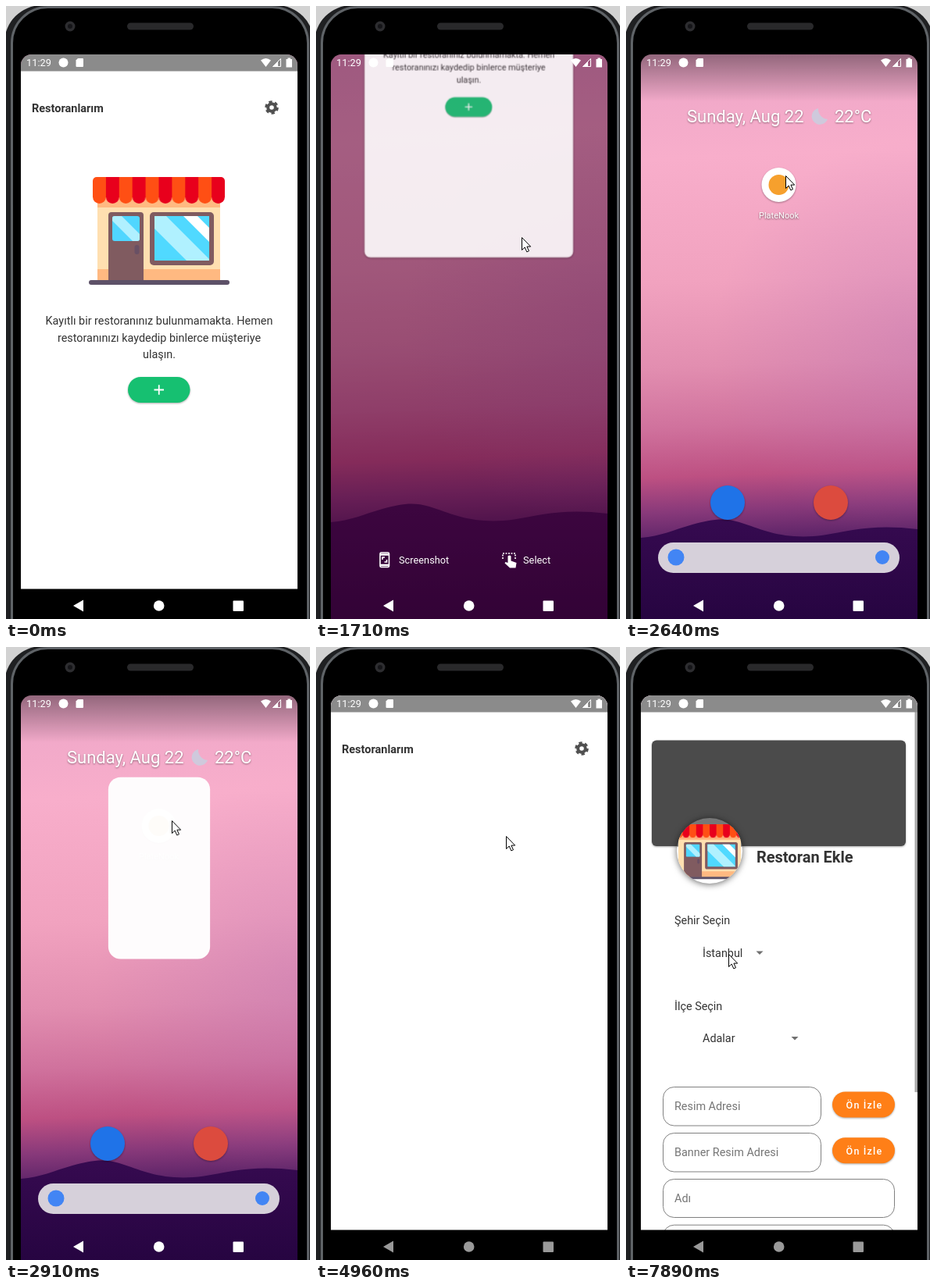
Recreate the animation shown at these times as an HTML page. Size 389 by 785 pixels, loop 8000 ms.

```html
<!DOCTYPE html>
<html lang="tr">
<head>
<meta charset="utf-8">
<title>Restoranlarım</title>
<style>
  html, body { margin: 0; width: 100%; height: 100%; overflow: hidden; background: #d2d2d2; }
  svg { display: block; width: 389px; height: 785px; font: 14.4px Roboto, sans-serif; }
  text { fill: #333; }
  .bold { font-weight: 700; }
  .mid { text-anchor: middle; }
  .light, .light text { fill: #fff; }
  .hint { fill: #757575; }
  .field { fill: #fff; stroke: #808080; }
  .pill { filter: drop-shadow(0 1px 1px #0005); }

  .anim { animation: 8s linear infinite; }
  .swap { animation: 8s step-end infinite; }
  #window { animation-name: window; }
  #sheet { animation-name: sheet; }
  #wall { animation-name: wall; }
  #scrim { animation-name: scrim; }
  #actions { animation-name: actions; }
  #home { animation-name: home; }
  #launch { animation-name: launch; }
  #splash { animation-name: splash; }
  #bars { animation-name: bars; }
  #status { animation-name: status; }
  #nav { animation-name: nav; }
  #content { animation-name: content; }
  #press { animation-name: press; }
  #form { animation-name: form; }
  #selects { animation-name: selects; }
  #fields { animation-name: fields; }
  #thumb { animation-name: thumb; }
  #cursor { animation-name: cursor; }

  @keyframes window {
    0%, 11% { transform: none; opacity: 1; }
    14% { transform: translate(47.7px, 68.4px) scale(.754); opacity: .85; }
    15.6%, 17.5% { transform: translate(47.7px, 68.4px) scale(.754); opacity: .78; }
    21.3%, 21.5% { transform: translate(47.7px, -241.4px) scale(.754); opacity: .89; }
    23.5% { transform: translate(47.7px, -560px) scale(.754); opacity: .89; }
    23.6% { transform: translate(47.7px, -560px) scale(.754); opacity: 0; }
    23.7%, 57.45% { transform: none; opacity: 0; }
    57.5%, 100% { transform: none; opacity: 1; }
  }
  @keyframes sheet {
    0%, 11% { rx: 0; }
    14%, 24% { rx: 10px; }
    25%, 100% { rx: 0; }
  }
  @keyframes wall {
    0%, 23.5% { transform: translateY(-20px); }
    29%, 100% { transform: none; }
  }
  @keyframes scrim {
    0%, 15.6% { opacity: .36; }
    21.4%, 23.5% { opacity: .47; }
    29%, 100% { opacity: 0; }
  }
  @keyframes actions {
    0%, 13% { opacity: 0; }
    15.6% { opacity: .85; }
    20%, 22.5% { opacity: 1; }
    25%, 100% { opacity: 0; }
  }
  @keyframes home {
    0%, 25% { opacity: 0; }
    30%, 40% { opacity: 1; }
    41%, 100% { opacity: 0; }
  }
  @keyframes launch {
    0%, 35.6% { x: 174px; y: 207px; width: 44px; height: 44px; rx: 22px; opacity: 0; animation-timing-function: ease-out; }
    36.5% { opacity: 1; }
    40%, 100% { x: 19px; y: 62px; width: 354px; height: 723px; rx: 0; opacity: 1; }
  }
  @keyframes splash {
    0%, 37% { opacity: 0; }
    40%, 100% { opacity: 1; }
  }
  @keyframes bars {
    0%, 11% { opacity: 1; }
    13%, 37.5% { opacity: 0; }
    40%, 100% { opacity: 1; }
  }
  @keyframes status {
    0%, 11% { opacity: 1; }
    13%, 17.5% { opacity: 0; }
    20%, 100% { opacity: 1; }
  }
  @keyframes nav {
    0%, 11% { opacity: 1; }
    13%, 17.5% { opacity: 0; }
    20%, 43.9% { opacity: 1; }
    57.5%, 100% { opacity: .6; }
  }
  @keyframes content {
    0% { opacity: 1; }
    40% { opacity: 0; }
    65.6%, 100% { opacity: 1; }
  }
  @keyframes press {
    0%, 82% { opacity: 0; }
    84% { opacity: .25; }
    86.5%, 100% { opacity: 0; }
  }
  @keyframes form {
    0% { opacity: 0; }
    86.875%, 100% { opacity: 1; }
  }
  @keyframes selects {
    0% { opacity: 0; }
    93.5%, 100% { opacity: 1; }
  }
  @keyframes fields {
    0% { transform: translateY(-253px); }
    93.5%, 100% { transform: none; }
  }
  @keyframes thumb {
    0% { height: 617px; }
    93.5%, 100% { height: 487px; }
  }
  @keyframes cursor {
    0%, 1.6% { transform: translate(335px, 692px); opacity: 0; }
    1.65% { transform: translate(335px, 692px); opacity: 1; animation-timing-function: ease-in-out; }
    8.25%, 10.9% { transform: translate(292px, 764px); opacity: 1; }
    15.625% { transform: translate(236px, 502px); }
    17.2% { transform: translate(238px, 482px); }
    21.3%, 21.5% { transform: translate(263px, 296px); animation-timing-function: ease-out; }
    31.375%, 34.5% { transform: translate(204px, 217px); }
    43.8%, 64.5% { transform: translate(243px, 242px); }
    66.9% { transform: translate(265px, 203px); }
    69.5%, 71.25% { transform: translate(280px, 235px); animation-timing-function: ease-in-out; }
    77.8%, 83.75% { transform: translate(193.5px, 496px); animation-timing-function: ease-in-out; }
    98.6%, 100% { transform: translate(131px, 393px); opacity: 1; }
  }
</style>
</head>
<body>
<svg viewBox="0 0 389 785">
  <defs>
    <clipPath id="screen"><rect x="19" y="62" width="354" height="740" rx="14"/></clipPath>
    <clipPath id="avatar"><circle cx="107" cy="261" r="42"/></clipPath>
    <clipPath id="pane"><path d="M190 269h70v57h-70z"/></clipPath>
    <clipPath id="doorPane"><rect x="136" y="269" width="35" height="32" rx="3"/></clipPath>
    <linearGradient id="sky" gradientUnits="userSpaceOnUse" x1="180" y1="62" x2="205" y2="700">
      <stop offset="0" stop-color="#eda6c8"/>
      <stop offset=".2" stop-color="#f8aecb"/>
      <stop offset=".45" stop-color="#f1a2bf"/>
      <stop offset=".62" stop-color="#e28eb0"/>
      <stop offset=".74" stop-color="#d0729d"/>
      <stop offset=".84" stop-color="#bd5082"/>
      <stop offset=".91" stop-color="#88397a"/>
      <stop offset="1" stop-color="#46195f"/>
    </linearGradient>
    <radialGradient id="haze" gradientUnits="userSpaceOnUse" cx="373" cy="430" r="260">
      <stop offset="0" stop-color="#b873b4" stop-opacity=".35"/>
      <stop offset="1" stop-color="#b873b4" stop-opacity="0"/>
    </radialGradient>
    <linearGradient id="hill" x2="0" y2="1">
      <stop offset="0" stop-color="#360a50"/>
      <stop offset="1" stop-color="#22033d"/>
    </linearGradient>
    <linearGradient id="shade" x2="0" y2="1">
      <stop offset="0" stop-opacity=".38"/>
      <stop offset="1" stop-opacity="0"/>
    </linearGradient>
    <linearGradient id="disc" x2="0" y2="1">
      <stop offset="0" stop-color="#777"/>
      <stop offset=".43" stop-color="#777"/>
      <stop offset=".44" stop-color="#fff"/>
    </linearGradient>
    <pattern id="awning" patternUnits="userSpaceOnUse" x="111" y="219" width="33.8" height="34">
      <path d="M0 0h16.9v25.5a8.45 8.45 0 0 1-16.9 0z" fill="#ff4f14"/>
      <path d="M16.9 0h16.9v25.5a8.45 8.45 0 0 1-16.9 0z" fill="#e8001c"/>
    </pattern>
    <g id="shop">
      <path d="M117 240h157v112H117z" fill="#ffdfb0"/>
      <path d="M117 240h157v18H117zM117 337h157v15H117z" fill="#ffb981"/>
      <rect x="111" y="219" width="169" height="34" rx="5" fill="url(#awning)"/>
      <path d="M131 352v-84q0-4 4-4h37q4 0 4 4v84z" fill="#805b60"/>
      <g clip-path="url(#doorPane)">
        <path d="M136 269h35v32h-35z" fill="#50d6ff"/>
        <path d="M136 269h12l32 32h-18l-26-26z" fill="#b0f0ff"/>
      </g>
      <rect x="164.500" y="306" width="6" height="12" rx="3" fill="#695064"/>
      <rect x="184" y="264" width="82" height="68" rx="5" fill="#805b60"/>
      <g clip-path="url(#pane)">
        <path d="M190 269h70v57h-70z" fill="#50d9ff"/>
        <path d="M190 269h15l57 57h-31l-41-41z" fill="#b0f1ff"/>
        <path d="M227 269h18l20 20v18z" fill="#fff"/>
      </g>
      <rect x="106" y="351" width="180" height="6" rx="3" fill="#5d5168"/>
    </g>
    <rect id="wide" class="field" x="47.500" y="681.500" width="296" height="49" rx="14"/>
    <g id="preview">
      <rect class="pill" x="264" y="569.500" width="80" height="33" rx="16.500" fill="#ff7f17"/>
      <text class="light mid" x="305" y="591" font-size="12.500" font-weight="500" letter-spacing="1.200">Ön İzle</text>
    </g>
    <path id="drop" d="M-4.500-2h9L0 2.500z" fill="#707070"/>
  </defs>

  <!-- phone body -->
  <rect x="-2" y="-1" width="396" height="900" rx="48" fill="#1f2022"/>
  <rect x="7.500" y="1.500" width="379" height="900" rx="46" stroke="#5f6367" stroke-width="3"/>
  <circle cx="82" cy="26" r="6.500" fill="#2d2d30"/>
  <circle cx="82" cy="26" r="3" fill="#151518"/>
  <rect x="155" y="21.500" width="85" height="9" rx="4.500" fill="#29292b"/>

  <g clip-path="url(#screen)">
    <g id="wall" class="anim">
      <path d="M19 30h354v780H19z" fill="url(#sky)"/>
      <path d="M19 30h354v780H19z" fill="url(#haze)"/>
      <path d="M19 681C45 679 60 671 85 664S125 655 145 661S185 677 215 679S265 675 290 671S340 666 373 670V820H19z" fill="url(#hill)"/>
    </g>
    <path id="scrim" class="anim" d="M19 62h354v723H19z" fill="#45042d"/>

    <g id="home" class="anim">
      <path d="M19 62h354v60H19z" fill="url(#shade)"/>
      <g class="light" font-size="22" style="filter:drop-shadow(0 1px 1px #0006)">
        <text x="78" y="149">Sunday, Aug 22</text>
        <text x="267" y="149">22°C</text>
      </g>
      <path d="M246 131a10.500 10.500 0 1 0 12 14a13 13 0 0 1-12-14z" fill="#cfc9dc"/>
      <circle class="pill" cx="195.500" cy="229" r="22" fill="#fff"/>
      <circle cx="195.500" cy="229" r="13" fill="#f6a02d"/>
      <text class="light mid" x="195.500" y="272" font-size="11" style="filter:drop-shadow(0 1px 1px #0008)">PlateNook</text>
      <circle class="pill" cx="130" cy="636" r="22" fill="#1f73e8"/>
      <circle class="pill" cx="262" cy="636" r="22" fill="#dc4b3e"/>
      <rect x="41" y="687" width="309" height="39" rx="19.500" fill="#d6d0da"/>
      <circle cx="64" cy="706" r="10.500" fill="#4285f4"/>
      <circle cx="328" cy="706" r="9" fill="#4285f4"/>
    </g>

    <g id="actions" class="anim light" font-size="12.800">
      <text x="106" y="714">Screenshot</text>
      <text x="265" y="714">Select</text>
      <g fill="none" stroke="#fff" stroke-width="1.600">
        <rect x="82" y="700" width="11.500" height="18.500" rx="1.500"/>
        <path d="M82 702.500h11M82 716h11" stroke-width="2.500"/>
        <path d="M85 709v-3h3M90.500 709v3h-3"/>
        <path d="M239 708v-7h16v7" stroke-dasharray="2 1.500"/>
      </g>
      <path d="M245.500 704.500q2-2 4 0v6l7 2.500-1 6.500h-7.500l-6.500-6 1-1.500 3 1z"/>
    </g>

    <rect id="launch" class="anim" fill="#fff"/>
    <g id="splash" class="anim">
      <circle cx="195.500" cy="371" r="43" fill="#f78c1e"/>
      <text class="bold mid" x="195.500" y="477" font-size="22">PlateNook</text>
    </g>

    <g id="window" class="anim">
      <rect id="sheet" class="anim" x="19" y="83" width="354" height="664" fill="#fff" style="filter:drop-shadow(0 1px 2px #0006)"/>
      <text class="bold" x="33" y="136" font-size="14.500">Restoranlarım</text>
      <g fill="none" stroke="#505050">
        <circle cx="340" cy="130" r="4.800" stroke-width="4"/>
        <circle cx="340" cy="130" r="7.300" stroke-width="3" stroke-dasharray="4.200 3.445"/>
      </g>
      <g id="content" class="swap">
        <use href="#shop"/>
        <g class="mid">
          <text x="196" y="408">Kayıtlı bir restoranınız bulunmamakta. Hemen</text>
          <text x="196" y="429.500">restoranınızı kaydedip binlerce müşteriye</text>
          <text x="196" y="451">ulaşın.</text>
        </g>
        <rect class="pill" x="156" y="475" width="79.500" height="33" rx="16.500" fill="#16c071"/>
        <rect id="press" class="anim" x="156" y="475" width="79.500" height="33" rx="16.500" fill="#fff"/>
        <path d="M189.500 491.500h12.500M195.750 485.200v12.500" stroke="#fff" stroke-width="1.800"/>
      </g>
    </g>

    <g id="form" class="swap">
      <path d="M19 83h354v664H19z" fill="#fff"/>
      <rect class="pill" x="33" y="119.500" width="325" height="135.500" rx="6" fill="#4b4b4b"/>
      <circle cx="107" cy="261" r="42" fill="url(#disc)" style="filter:drop-shadow(0 1px 4px #0009)"/>
      <g clip-path="url(#avatar)">
        <use href="#shop" transform="translate(7.300 115.300) scale(.51)"/>
      </g>
      <text class="bold" x="167" y="276" font-size="20">Restoran Ekle</text>
      <g id="selects" class="swap">
        <text x="62" y="355">Şehir Seçin</text>
        <text x="98" y="396.500">İstanbul</text>
        <use href="#drop" x="171" y="391.500"/>
        <text x="62" y="464.500">İlçe Seçin</text>
        <text x="98" y="506">Adalar</text>
        <use href="#drop" x="216" y="501"/>
      </g>
      <g id="fields" class="swap">
        <rect class="field" x="47.500" y="563.500" width="202" height="49.500" rx="14"/>
        <rect class="field" x="47.500" y="622.500" width="202" height="49.500" rx="14"/>
        <use href="#preview"/>
        <use href="#preview" y="58.700"/>
        <use href="#wide"/>
        <use href="#wide" y="58.700"/>
        <use href="#wide" y="117.400"/>
        <use href="#wide" y="176.100"/>
        <use href="#wide" y="234.800"/>
        <text class="hint" x="62" y="593">Resim Adresi</text>
        <text class="hint" x="62" y="652">Banner Resim Adresi</text>
        <text class="hint" x="62" y="711">Adı</text>
      </g>
      <rect id="thumb" class="swap" x="369.500" y="83" width="3.500" fill="#a9a9a9"/>
    </g>

    <g id="bars" class="anim">
      <path d="M19 62h354v21.500H19z" fill="#8b8b8b"/>
      <path d="M19 746.500h354v39H19z"/>
    </g>
    <g id="status" class="anim light">
      <text x="26" y="77" font-size="12.800">11:29</text>
      <circle cx="73.500" cy="72.500" r="6"/>
      <path d="M92 67h6q1 0 1 1v9q0 1-1 1h-7.500q-1 0-1-1v-7.500z"/>
      <path d="M326 69.500q6.500-5 13 0l-6.500 8.500z"/>
      <path d="M341.500 77.500l10-10v10z" fill="none" stroke="#fff"/>
      <path d="M341 78l7-7v7z"/>
      <path d="M358.500 68h2v-1.500h3.500V68h2v10.500h-7.500z"/>
    </g>
    <g id="nav" class="anim light">
      <path d="M86 768l13-7.500v15z"/>
      <circle cx="195.700" cy="768" r="6.800"/>
      <rect x="290.500" y="761.500" width="13.500" height="13.500" rx="1"/>
    </g>
  </g>

  <path id="cursor" class="anim" d="M.5.5v16l3.700-3.500 2.600 5.900 2.700-1.200-2.600-5.600h4.800z" fill="#fff" stroke="#000"/>
</svg>
</body>
</html>
```
